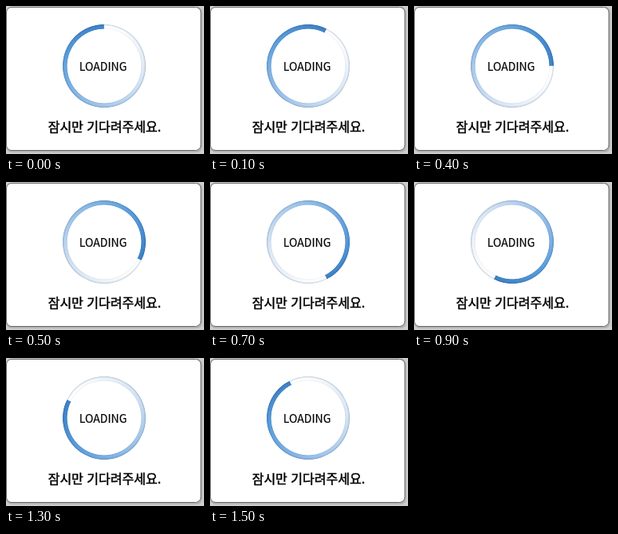
An HTML page for the animation above (1.6 s loop, 248 by 185 pixels).

```html
<!DOCTYPE html>
<html lang="ko">
<head>
<meta charset="utf-8">
<style>
  html, body { margin: 0; width: 100%; height: 100%; overflow: hidden; background: #c6c6c6; }
  #stage { position: relative; width: 248px; height: 185px; overflow: hidden; }
  svg { position: absolute; left: 0; top: 0; }
  text {
    text-anchor: middle; stroke: #000;
    font-family: "Noto Sans CJK KR", "Noto Sans CJK", "Noto Sans", sans-serif;
  }
  #ring {
    --band: radial-gradient(circle, transparent 46px, #000 46.8px, #000 51.6px, transparent 52.4px);
    position: absolute; left: 70.5px; top: 22.5px; width: 104px; height: 104px;
    background:
      radial-gradient(circle closest-side, rgba(50,80,115,.06) 46.5px, rgba(255,255,255,.08) 48px,
        rgba(255,255,255,.04) 50px, rgba(50,80,115,.28) 52px),
      conic-gradient(#fff 0deg, #f8fafc 35deg, #d6e4f3 110deg, #92bce6 200deg, #5197d9 285deg,
        #3a82c8 330deg, #347cc2 359.3deg, #fff 360deg);
    -webkit-mask: var(--band);
    mask: var(--band);
  }
</style>
</head>
<body>
<div id="stage">
  <svg width="248" height="185" viewBox="0 0 248 185">
    <rect width="248" height="185" fill="#cecece"/>
    <rect y="1" width="246" height="182" rx="7" fill="#b4b4b4"/>
    <rect x=".5" y="1.5" width="243.5" height="179" rx="6.5" fill="#fff" stroke="#666"/>
    <text x="121.6" y="81" font-size="14" stroke-width=".15">LOADING</text>
    <text x="123.4" y="156.5" font-size="16" stroke-width=".5">잠시만 기다려주세요.</text>
  </svg>
  <div id="ring"></div>
</div>
<script>
  const ring = document.getElementById("ring");
  const STEPS = 16, STEP_MS = 100;
  const start = performance.now();

  // Each quarter turn passes the slopes 0, 1/2, 1 and 2.
  const QUARTER = [0, 1 / 2, 1, 2].map(slope => Math.atan(slope) * 180 / Math.PI);

  function draw(ms) {
    const step = Math.floor(ms / STEP_MS) % STEPS;
    const angle = Math.floor(step / 4) * 90 + QUARTER[step % 4];
    ring.style.transform = `rotate(${angle}deg)`;
  }

  function tick() {
    draw(performance.now() - start);
    requestAnimationFrame(tick);
  }
  tick();
</script>
</body>
</html>
```
